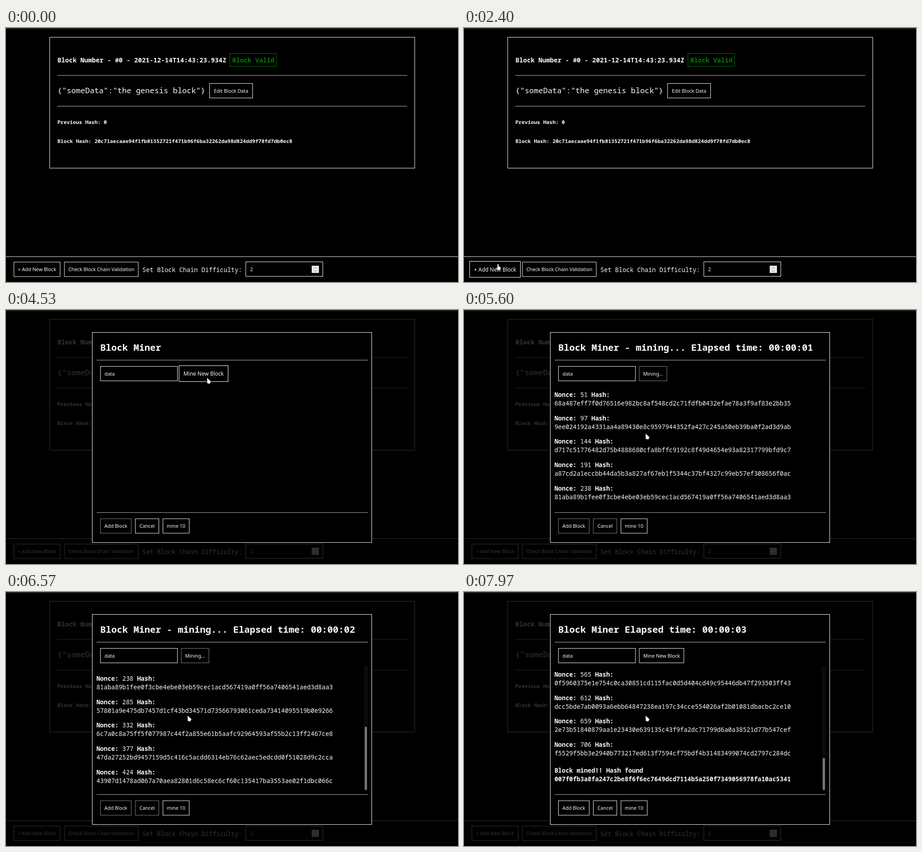
An HTML page with a canvas that plays this animation: 998x561 px, repeating every 8 s.

```html
<!DOCTYPE html>
<html lang="en">
<head>
<meta charset="utf-8">
<title>Block chain demo</title>
<style>
  html, body { margin: 0; width: 100%; height: 100%; overflow: hidden; background: #000; }
  canvas { display: block; width: 998px; height: 561px; }
</style>
</head>
<body>
<canvas id="stage" width="998" height="561"></canvas>
<script>
const ctx = document.getElementById('stage').getContext('2d');
const LOOP = 8000;
const MONO = '"Noto Sans Mono", "DejaVu Sans Mono", monospace';
const SANS = '"Noto Sans", "Open Sans", sans-serif';
const WHITE = '#fafafa', DISABLED = '#858585', RULE = '#969696';

const TIME = { modal: 2620, focus: 3230, type: 3540, mine: 4550, firstRow: 4805, rowStep: 197, found: 7725 };
const LIST = { top: 163, height: 275, row: 51.85, pad: 11.75, foundHeight: 60.8 };

const ROWS = [
  [51, '68a487eff7f0d76516e982bc8af548cd2c71fdfb0432efae78a3f9af83e2bb35'],
  [97, '9ee024192a4331aa4a89430e8c9597944352fa427c245a50eb39ba0f2ad3d9ab'],
  [144, 'd717c51776482d75b4888680cfa8bffc9192c8f49d4654e93a82317799bfd9c7'],
  [191, 'a87cd2a1eccbb44da5b3a827af67eb1f5344c37bf4327c99eb57ef308656f0ac'],
  [238, '81aba89b1fee0f3cbe4ebe03eb59cec1acd567419a0ff56a7406541aed3d8aa3'],
  [285, '57801a9e475db7457d1cf43bd34571d73566793061ceda73414095519b0e9266'],
  [332, '6c7a0c8a75ff5f077987c44f2a855e61b5aafc92964593af55b2c13ff2467ce8'],
  [377, '47da27252bd9457159d5c416c5acdd6314eb76c62aec5edcdd0f51028d9c2cca'],
  [424, '43907d1478ad067a70aea82801d6c58ec6cf60c135417ba3553ae02f1dbc066c'],
  [471, '36552f27e6b35e8f89302ecf4dc6345b030d83b1bb13265490d41167547dba17'],
  [518, 'd28eb7fa49501e225d38eaacc2df2ddf1c8ce8d867c12707765a8e33ad5fa3a4'],
  [565, '0f5960375e1e754c0ca30851cd115fac0d5d404cd49c95446db47f293503ff43'],
  [612, 'dcc5bde7ab0093a6ebb64847238ea197c34cce554026af2b01081dbacbc2ce10'],
  [659, '2e73b51840879aa1e23430e639135c43f9fa2dc71799d6a0a38521d77b547cef'],
  [706, 'f5529f5bb3e2940b773217ed613f7594cf75bdf4b31483499074cd2797c284dc']
];
const FOUND_HASH = '007f0fb3a8fa247c2be8f6f6ec7649dcd7114b5a250f7349056978fa10ac5341';

// Pointer stops: time, x, y
const POINTER = [
  [1500, 885, 270], [2230, 75, 521], [2700, 75, 521], [3110, 300, 141],
  [3930, 300, 141], [4290, 444, 150], [4620, 444, 150], [5100, 401, 273]
];

const clamp = v => Math.min(1, Math.max(0, v));
const ease = v => v * v * (3 - 2 * v);
const progress = (t, start, length) => ease(clamp((t - start) / length));

// y is the middle of the capital letters; returns the x after the text.
function text(str, x, y, size, { bold = false, font = MONO, color = WHITE, align = 'left' } = {}) {
  ctx.font = `${bold ? 'bold ' : ''}${size}px ${font}`;
  ctx.fillStyle = color;
  ctx.textAlign = align;
  ctx.fillText(str, x, y + size * 0.357);
  return x + ctx.measureText(str).width;
}

function box(x, y, w, h, color = WHITE) {
  ctx.strokeStyle = color;
  ctx.lineWidth = 1;
  ctx.strokeRect(x + 0.5, y + 0.5, w - 1, h - 1);
}

function rule(x, y, w, color = RULE) {
  ctx.fillStyle = color;
  ctx.fillRect(x, y, w, 1.3);
}

function button(label, x, y, w, { hover = 0, color = WHITE } = {}) {
  const h = 33, scale = 1 + 0.1 * hover;
  ctx.save();
  ctx.translate(x + w / 2, y + h / 2);
  ctx.scale(scale, scale);
  box(-w / 2, -h / 2, w, h, color);
  text(label, 0, 0.3, 10.8, { font: SANS, align: 'center' });
  ctx.restore();
}

function chevron(x, y, dir) {
  ctx.beginPath();
  ctx.moveTo(x - 2.5, y + dir);
  ctx.lineTo(x, y - dir);
  ctx.lineTo(x + 2.5, y + dir);
  ctx.stroke();
}

function drawPage(t) {
  box(96, 20, 807, 290);
  text('Block Number - #0 - 2021-12-14T14:43:23.934Z', 113.5, 71, 14.13, { bold: true });
  box(494, 56, 104, 29, '#007a00');
  text('Block Valid', 499.5, 71, 14.13, { bold: true, color: '#008000' });
  rule(113, 104, 773);
  text('{"someData":"the genesis block"}', 113.5, 137.5, 17);
  button('Edit Block Data', 449, 122, 96);
  rule(113, 172, 773);
  text('Previous Hash: 0', 113.5, 208, 11.38, { bold: true });
  text('Block Hash: 20c71aecaae94f1fb81352721f471b96f6ba32262da98d824dd9f78fd7db0ec8',
    113.5, 249.5, 11.38, { bold: true });

  ctx.fillStyle = WHITE;
  ctx.fillRect(0, 504.5, 998, 1);
  const hover = t < TIME.modal ? progress(t, 2190, 110) : 0;
  button('+ Add New Block', 17, 516.5, 103, { hover });
  button('Check Block Chain Validation', 128.5, 516.5, 164);
  text('Set Block Chain Difficulty:', 301, 534, 13.6);
  box(529, 516, 171, 33);
  text('2', 539, 533.5, 10.8, { font: SANS });
  ctx.fillStyle = '#e9e9ec';
  ctx.fillRect(675, 525, 16, 16);
  ctx.strokeStyle = '#777';
  chevron(683, 530, 1.2);
  chevron(683, 536.5, -1.2);
}

function drawList(t) {
  if (t < TIME.firstRow) return;
  const found = t >= TIME.found;
  const count = Math.min(ROWS.length, 1 + Math.floor((t - TIME.firstRow) / TIME.rowStep));
  const content = count * LIST.row + LIST.pad + (found ? LIST.foundHeight : 0);
  const scroll = Math.max(0, content - LIST.height);

  ctx.save();
  ctx.beginPath();
  ctx.rect(195, LIST.top, 608, LIST.height);
  ctx.clip();
  for (let i = 0; i < count; i++) {
    const [nonce, hash] = ROWS[i];
    const y = 186.8 + i * LIST.row - scroll;
    const x = text('Nonce: ', 199.7, y, 13.6, { bold: true });
    text('Hash:', text(nonce + ' ', x, y, 13.6), y, 13.6, { bold: true });
    text(hash, 199.7, y + 19, 13.6);
  }
  if (found) {
    text('Block mined!! Hash found', 199.7, 394, 13.6, { bold: true });
    text(FOUND_HASH, 199.7, 413, 13.6, { bold: true });
  }
  if (scroll > 0) {
    const thumb = LIST.height ** 2 / content - 18;
    ctx.fillStyle = '#0a0a10';
    ctx.fillRect(790.5, LIST.top, 8.5, LIST.height);
    ctx.fillStyle = '#777';
    ctx.beginPath();
    ctx.roundRect(792, 437.5 - thumb, 5, thumb, 2.5);
    ctx.fill();
  }
  ctx.restore();
}

function title(t) {
  if (t < TIME.mine) return 'Block Miner';
  const seconds = Math.floor((t - TIME.mine) / 1000);
  return `Block Miner ${t < TIME.found ? '- mining... ' : ''}Elapsed time: 00:00:0${seconds}`;
}

function drawModal(t) {
  const mining = t >= TIME.mine && t < TIME.found;
  ctx.fillStyle = '#000';
  ctx.fillRect(190, 49, 618, 465);
  box(190, 49, 618, 465);
  text(title(t), 208, 82.3, 20.4, { bold: true });
  rule(200, 110, 599);

  box(208, 124, 171, 33, t >= TIME.focus ? '#f4fbff' : '#c8c8c8');
  const typed = 'data'.slice(0, Math.max(0, Math.ceil((t - TIME.type) / 110)));
  const end = text(typed, 217.5, 141.3, 10.8, { font: SANS });
  if (t >= TIME.focus && t < 4300) {
    ctx.fillStyle = WHITE;
    ctx.fillRect(Math.round(end), 135, 1, 13);
  }

  if (mining) button('Mining...', 386.5, 124, 62, { color: DISABLED });
  else button('Mine New Block', 386.5, 124, 99.5, { hover: t < TIME.mine ? progress(t, 4220, 110) : 0 });

  drawList(t);
  rule(200, 446.7, 599, '#8d8d98');
  button('Add Block', 208, 460.5, 69, { color: t < TIME.found ? DISABLED : WHITE });
  button('Cancel', 285, 460.5, 53, { color: mining ? DISABLED : WHITE });
  button('mine 10', 346, 460.5, 59);
}

function pointerAt(t) {
  const next = POINTER.findIndex(stop => stop[0] > t);
  if (next < 0) return POINTER[POINTER.length - 1].slice(1);
  const [t0, x0, y0] = POINTER[next - 1], [t1, x1, y1] = POINTER[next];
  const k = progress(t, t0, t1 - t0);
  return [x0 + (x1 - x0) * k, y0 + (y1 - y0) * k];
}

function shape(points) {
  ctx.beginPath();
  points.forEach(([x, y]) => ctx.lineTo(x, y));
  ctx.closePath();
  ctx.stroke();
  ctx.fill();
}

function drawPointer(t) {
  if (t < POINTER[0][0]) return;
  const [x, y] = pointerAt(t);
  const overInput = t >= TIME.modal && x > 208 && x < 379 && y > 124 && y < 157;
  const overAdd = t < TIME.modal && x < 120 && y > 516;
  ctx.save();
  ctx.translate(x, y);
  ctx.fillStyle = '#fff';
  ctx.strokeStyle = '#000';
  ctx.lineWidth = 2;
  ctx.lineJoin = 'round';
  if (overInput) {
    ctx.fillRect(-0.5, -6, 1, 12);
    ctx.fillRect(-2.5, -6.5, 5, 1);
    ctx.fillRect(-2.5, 5.5, 5, 1);
  } else if (overAdd) {
    shape([[-1, 1], [0, 0], [1.2, 1], [1.4, 5.5], [5.5, 7], [6, 9], [5, 14], [-0.5, 14], [-4, 9], [-3.3, 8], [-1, 9.5]]);
  } else {
    shape([[0, 0], [8.5, 8], [5.8, 13], [4, 12.4], [0.3, 11.8]]);
  }
  ctx.restore();
}

function draw(t) {
  ctx.fillStyle = '#000';
  ctx.fillRect(0, 0, 998, 561);
  drawPage(t);
  const open = progress(t, TIME.modal, 150);
  if (open > 0) {
    ctx.fillStyle = `rgba(0, 0, 0, ${0.8 * open})`;
    ctx.fillRect(0, 0, 998, 561);
    ctx.globalAlpha = open;
    drawModal(t);
    ctx.globalAlpha = 1;
  }
  ctx.fillStyle = '#20231e';
  ctx.fillRect(0, 0, 998, 2.5);
  drawPointer(t);
}

const start = performance.now();
function tick() {
  draw((performance.now() - start) % LOOP);
  requestAnimationFrame(tick);
}
tick();
</script>
</body>
</html>
```
